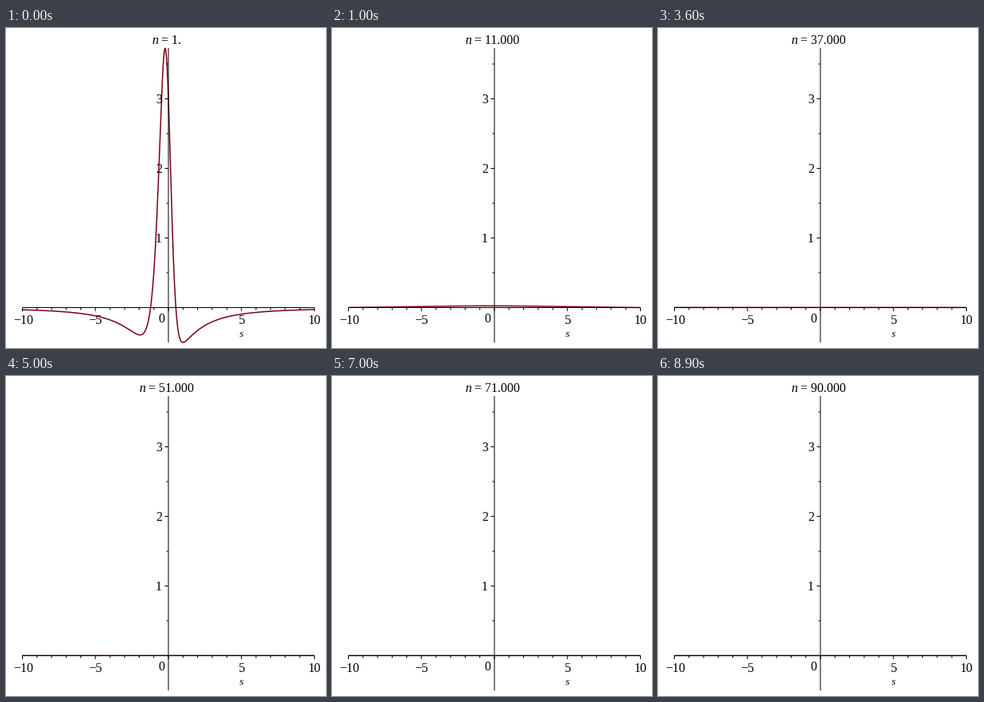
Animation of 400 by 400 pixels, one loop 9 s. Source, as a matplotlib script:

```python
import numpy as np
import matplotlib.pyplot as plt
from matplotlib.animation import FuncAnimation

SIZE, DPI = 400, 100
PX = 72 / DPI                 # one pixel in points
X0, Y0 = 203, 349.5           # plot origin in pixels
SX, SY = 18.25, 87            # pixels per unit
BLACK, RED = "black", "#78000e"

plt.rcParams.update({
    "font.family": "Liberation Serif",
    "path.snap": False,
})

fig = plt.figure(figsize=(SIZE / DPI, SIZE / DPI), dpi=DPI, facecolor="white")
ax = fig.add_axes([0, 0, 1, 1])
ax.set_xlim(0, SIZE)
ax.set_ylim(SIZE, 0)
ax.axis("off")


def segment(x1, y1, x2, y2):
    ax.plot([x1, x2], [y1, y2], color=BLACK, lw=PX,
            solid_capstyle="butt", zorder=3)


def label(x, y, text, size=16, ha="center", style="normal"):
    return ax.text(x, y, text, fontsize=size * PX, ha=ha, va="baseline",
                   style=style, color=BLACK, zorder=4)


def draw_axes():
    segment(X0 - 10 * SX, Y0, X0 + 10 * SX, Y0)
    segment(X0, 25, X0, 393)
    for s in range(-10, 11):
        x = X0 + s * SX
        segment(x, Y0, x, Y0 + (4.5 if s % 5 == 0 else 3))
    for k in range(1, 8):
        y = Y0 - k * SY / 2
        segment(X0 - (4.5 if k % 2 == 0 else 2.5), y, X0, y)

    label(21.5, 370, "\u221210")
    label(112, 370, "\u22125")
    label(294, 370, "5")
    label(385.5, 370, "10")
    label(194, 368, "0")
    for v in (1, 2, 3):
        label(191, Y0 - v * SY + 5.5, str(v))
    label(294.5, 386, "s", size=13, style="italic")


def curve(s, n):
    z = s + 1j * n
    return (2 / z**3 - 3 / z**2).real


draw_axes()
s = np.linspace(-10, 10, 1201)
line, = ax.plot([], [], color=RED, lw=1.5 * PX, solid_capstyle="butt",
                solid_joinstyle="round", zorder=2)
name = label(0, 20, "n", ha="left", style="italic")
value = label(0, 20, "", ha="left")


def update(i):
    n = i + 1
    number = "1." if n == 1 else f"{n:#.5g}"
    width = 21 + 8 * len(number)
    left = 200.5 - width / 2
    name.set_x(left)
    value.set_x(left + 12)
    value.set_text("= " + number)
    line.set_data(X0 + SX * s, Y0 - SY * curve(s, n))
    return line, name, value


anim = FuncAnimation(fig, update, frames=90, interval=100,
                     repeat=True, repeat_delay=0)
plt.show()
```
